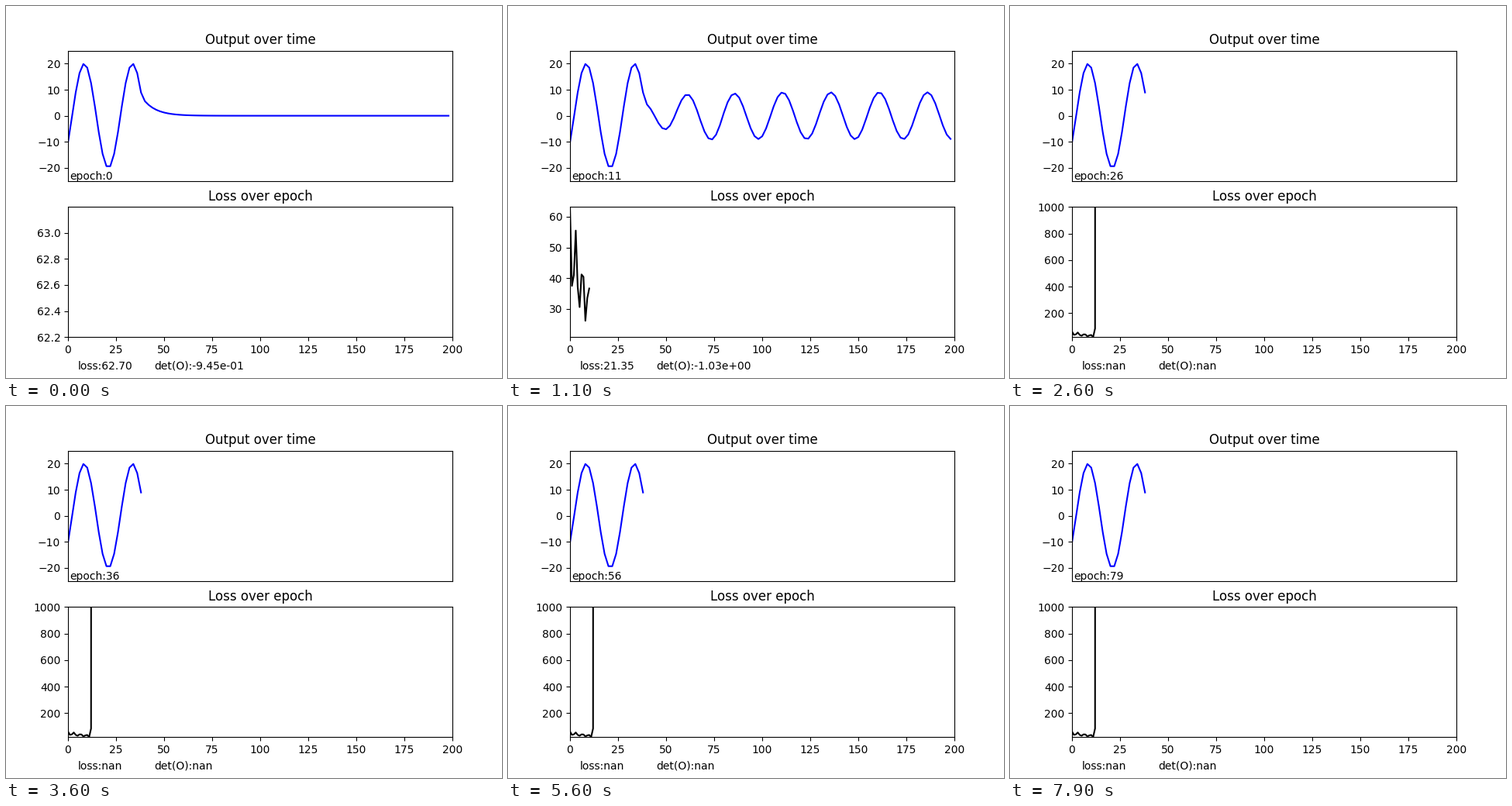
Animation of 640x480 px, one loop 8 s. Source, as a matplotlib script:

```python
import numpy as np
import matplotlib.pyplot as plt
from matplotlib.animation import FuncAnimation

EPOCHS = 80
SEED_LEN = 20            # known samples that start every output
BLOWUP = 13              # last epoch with a finite loss
t = np.arange(0, 200, 2)
s = t[SEED_LEN:] - t[SEED_LEN]
epochs = np.arange(EPOCHS)

# A few early losses, then a falling wobble until training diverges.
losses = 50 - 2 * epochs + 8 * np.cos(2 * np.pi * (epochs - 9.7) / 3.2)
losses[:7] = 62.6999, 37.5, 41, 55.5, 37.2, 30.6, 41.23
losses[BLOWUP - 1:BLOWUP + 2] = 85, 5e4, np.inf
losses[BLOWUP + 2:] = np.nan

dets = -0.945 - 0.0077 * epochs
dets[BLOWUP + 1] = 1460
dets[BLOWUP + 2:] = np.nan

seed = -20 * np.cos(0.25 * (t[:SEED_LEN] - 21))
decay = 5.6 * np.exp(-s / 6.6)
ripple = np.where(s < 38,
                  1.17 * np.cos(0.25 * (s - 24)) + 3.28 * np.exp(-s / 3.7),
                  -1.1 * np.exp(-(s - 38) / 5))


def output(epoch):
    """Seed samples followed by the generated tail."""
    wave = np.cos(0.25 * s + 1.2)
    if epoch <= 6:
        tail = decay + (ripple - decay) * epoch / 6
    elif epoch < BLOWUP:
        tail = ripple + 1.8 * (epoch - 6) * (1 - np.exp(-s / 12)) * wave
    elif epoch == BLOWUP:
        tail = ripple + 3 * np.exp(s / 30) * wave
    else:
        tail = np.full(len(s), np.nan)
    return np.concatenate([seed, tail])


fig, (top, low) = plt.subplots(2, 1, figsize=(6.4, 4.8), dpi=100)
top.set(title="Output over time", xlim=(0, 200), ylim=(-25, 25), xticks=[])
low.set(title="Loss over epoch", xlim=(0, 200))
out_line, = top.plot([], [], "b")
loss_line, = low.plot([], [], "k")
epoch_text = top.text(1, -24.5, "")
loss_text = fig.text(93 / 640, 11 / 480, "")
det_text = fig.text(191.6 / 640, 11 / 480, "")


def update(epoch):
    out_line.set_data(t, output(epoch))
    loss_line.set_data(epochs[:epoch], losses[:epoch])
    seen = losses[:epoch + 1]
    low.set_ylim(np.nanmin(seen) - 0.5, min(np.nanmax(seen) + 0.5, 1000))
    epoch_text.set_text(f"epoch:{epoch}")
    loss_text.set_text(f"loss:{losses[epoch]:.2f}")
    det_text.set_text(f"det(O):{dets[epoch]:.2e}")
    return out_line, loss_line, epoch_text, loss_text, det_text


anim = FuncAnimation(fig, update, frames=EPOCHS, interval=100,
                     repeat=True, repeat_delay=0, blit=False)
plt.show()
```
